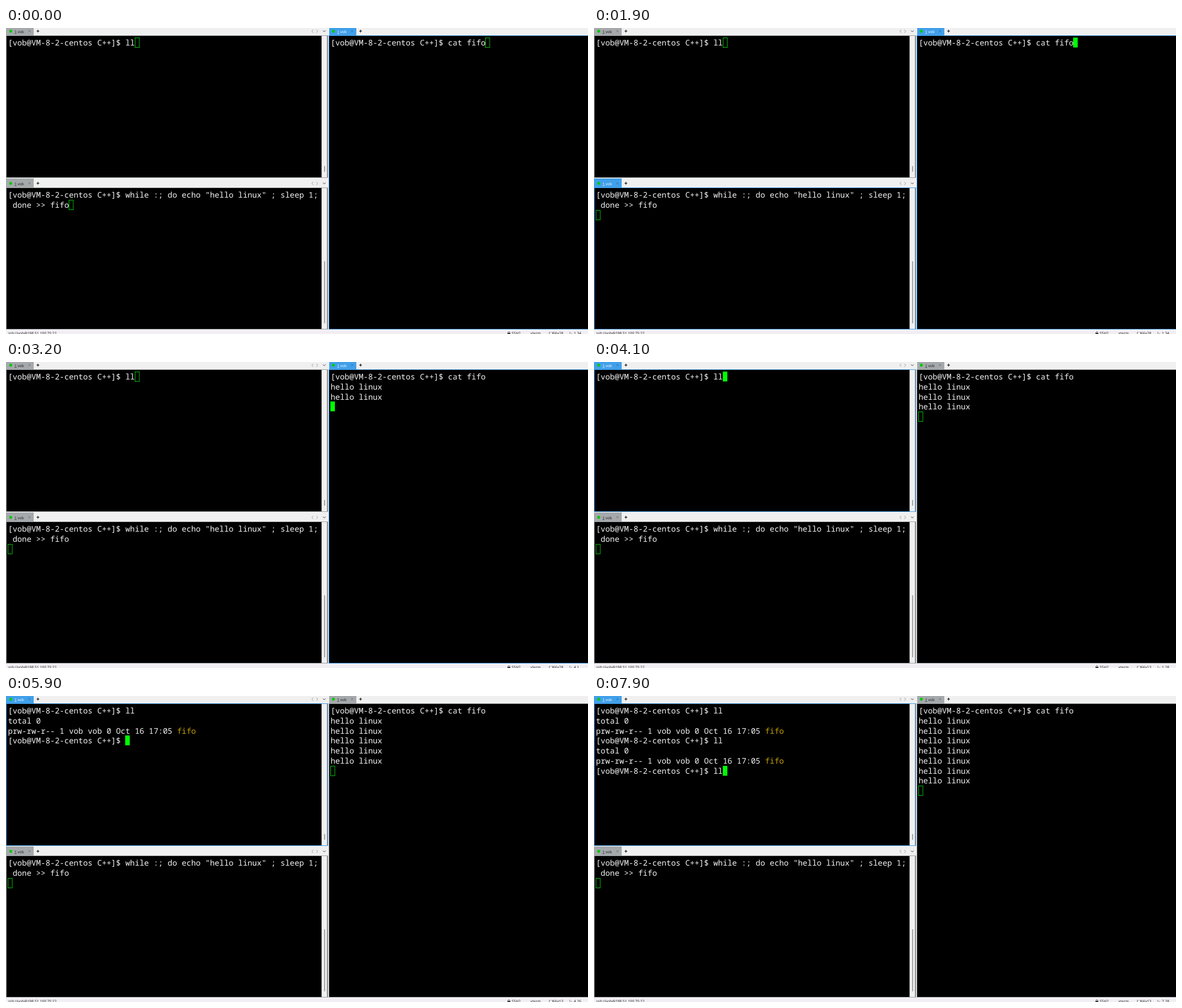
Write an HTML page that moves like this. It is 1030 px wide and 543 px high and loops after 8 s.

```html
<!DOCTYPE html>
<html lang="en">
<head>
<meta charset="utf-8">
<title>Named pipe demo</title>
<style>
  html, body { margin: 0; width: 100%; height: 100%; overflow: hidden; background: #f0f0f0; }
  svg { display: block; width: 1030px; height: 543px; }
  text { white-space: pre; text-rendering: geometricPrecision; }
  .term { font: 13.87px "Noto Sans Mono", "DejaVu Sans Mono", monospace; fill: #f4f4f4; }
  .ui { font: 6.5px "Noto Sans", "Open Sans", sans-serif; fill: #222; }
  .fifo { fill: #c4a000; }
  .line { fill: none; stroke-width: 1; }
</style>
</head>
<body>
<svg id="stage" viewBox="0 0 1030 543"></svg>
<script>
const LOOP = 8000, CHAR = 8.32, ROW = 17.75;
const USER = 'vob';
const PROMPT = `[${USER}@VM-8-2-centos C++]$ `;
const LISTING = `prw-rw-r-- 1 ${USER} ${USER} 0 Oct 16 17:05 fifo`;
const WHILE = ['while :; do echo "hello linux" ; sleep 1;', ' done >> fifo'];

const panes = {
  top:   { x: 0,   y: 0,   w: 569, bottom: 265.5, size: '66x13', thumb: [245, 255] },
  low:   { x: 0,   y: 270, w: 569, bottom: 534.5, size: '66x13', thumb: [414, 524] },
  right: { x: 571, y: 0,   w: 470, bottom: 534.5, size: '66x28' }
};

// Each step changes only the listed parts of the state.
const steps = [
  [0,    { lit: ['right'], focus: 'right', solid: false, looping: false, hellos: 0, runs: 0, typed: 'll' }],
  [600,  { lit: ['low'], focus: 'low', solid: true }],
  [1100, { looping: true }],
  [1900, { lit: ['low', 'right'], focus: 'right' }],
  [2000, { lit: ['right'] }],
  [2200, { hellos: 1 }],
  [3200, { hellos: 2 }],
  [4000, { lit: ['right', 'top'], focus: 'top' }],
  [4100, { lit: ['top'], hellos: 3 }],
  [5000, { hellos: 4 }],
  [5100, { runs: 1, typed: '' }],
  [5900, { hellos: 5 }],
  [6100, { typed: 'l' }],
  [6300, { typed: 'll' }],
  [6600, { runs: 2, typed: '' }],
  [6800, { hellos: 6 }],
  [7700, { hellos: 7, typed: 'l' }],
  [7900, { typed: 'll' }]
];

const rect = (x, y, w, h, fill) => `<rect x="${x}" y="${y}" width="${w}" height="${h}" fill="${fill}"/>`;
const path = (d, color, width = 1) => `<path class="line" d="${d}" stroke="${color}" style="stroke-width:${width}"/>`;
const label = (x, y, s, fill = '#222') => `<text class="ui" x="${x}" y="${y}" style="fill:${fill}">${s}</text>`;
const escape = s => s.replace(/&/g, '&amp;').replace(/</g, '&lt;').replace(/>/g, '&gt;');

function linesOf(name, s) {
  if (name === 'low') return [PROMPT + WHILE[0], WHILE[1], ...(s.looping ? [''] : [])];
  if (name === 'right') {
    const out = Array(s.hellos).fill('hello linux');
    return [PROMPT + 'cat fifo', ...out, ...(s.hellos ? [''] : [])];
  }
  const run = [PROMPT + 'll', 'total 0', LISTING];
  return [...Array(s.runs).fill(run).flat(), PROMPT + s.typed];
}

function drawTab(p, lit) {
  const { x, y } = p, left = x ? x + 1 : 0;
  return rect(left, y - 3, x + 49 - left, 16, lit ? '#41a0ea' : '#a5a9ab') +
    `<circle cx="${x + 8.3}" cy="${y + 5.7}" r="2.6" fill="#0c0c0c" style="fill:#0bc80b"/>` +
    label(x + 15, y + 8.5, `<tspan text-decoration="underline">1</tspan> ${USER}`, lit ? '#fff' : '#1a1a1a') +
    path(`M${x + 39.7} ${y + 3.7}l3.6 3.6m0 -3.6l-3.6 3.6`, lit ? '#2a5f8c' : '#5c5c5c', 0.7) +
    path(`M${x + 54} ${y + 5.5}h5m-2.5 -2.5v5`, '#111', 1.1);
}

function drawScroll(p) {
  const y = p.y;
  return rect(558.5, y + 14, 10, p.bottom - y - 14.5, '#f0f0f0') +
    path(`M563.8 ${p.thumb[0]}V${p.thumb[1]}`, '#777', 1.2) +
    path(`M544 ${y + 3}l-3 2.7l3 2.7M549 ${y + 3}l3 2.7l-3 2.7`, '#999', 0.9) +
    path(`M561 ${y + 4.5}l2.3 2.3l2.3 -2.3`, '#333', 1);
}

function drawLine(s, x, y) {
  const body = s === LISTING
    ? escape(s.slice(0, -4)) + '<tspan class="fifo">fifo</tspan>'
    : escape(s);
  return `<text class="term" x="${x}" y="${y}">${body}</text>`;
}

function drawPane(name, s) {
  const p = panes[name], lit = s.lit.includes(name), lines = linesOf(name, s);
  const x0 = p.x + 3.4, rowTop = i => Math.round(p.y + 17 + i * ROW);
  const last = lines.length - 1;
  const cx = Math.floor(x0 + lines[last].length * CHAR), cy = rowTop(last);
  const cursor = s.solid && s.focus === name
    ? rect(cx, cy, 8, 17.5, '#00ff00')
    : `<rect class="line" x="${cx + .5}" y="${cy + .5}" width="7.5" height="17" stroke="#00c000"/>`;
  return drawTab(p, lit) +
    rect(p.x + 1, p.y + 14, p.w - 1, p.bottom - p.y - 14, '#000') +
    (p.thumb ? drawScroll(p) : '') +
    `<rect class="line" x="${p.x + .5}" y="${p.y + 13.5}" width="${p.w}" height="${p.bottom - p.y - 13.5}" stroke="${lit ? '#41a0ea' : '#a0a4a6'}"/>` +
    lines.map((t, i) => drawLine(t, x0, rowTop(i) + 14)).join('') + cursor;
}

function drawStatus(s) {
  const lines = linesOf(s.focus, s), y = 544.4;
  const pos = `${lines.length},${lines[lines.length - 1].length + 1}`;
  return rect(0, 535, 1030, 8, '#f2eff4') +
    label(4, y, `ssh://${USER}@198.51.100.75:22`) +
    rect(887.5, 541, 5, 3, '#333') + path('M888.5 541v-1.2q1.5 -2 3 0v1.2', '#333', 0.8) +
    label(895, y, 'SSH2') + label(928, y, 'xterm') +
    path('M961.5 543v-3h2m2 0h2v3', '#555', 0.8) +
    label(968, y, panes[s.focus].size) +
    path('M997 540h2m-1 0v3m2 -1h2', '#777', 0.8) +
    label(1005, y, pos);
}

const stage = document.getElementById('stage');
let shown = -1;

function frame(now) {
  const t = now % LOOP;
  const count = steps.filter(([at]) => at <= t).length;
  if (count !== shown) {
    shown = count;
    const s = Object.assign({}, ...steps.slice(0, count).map(step => step[1]));
    stage.innerHTML = rect(0, 0, 1030, 543, '#f0f0f0') +
      Object.keys(panes).map(name => drawPane(name, s)).join('') + drawStatus(s);
  }
  requestAnimationFrame(tick);
}

const start = performance.now();
function tick() { frame(performance.now() - start); }
tick();
</script>
</body>
</html>
```
